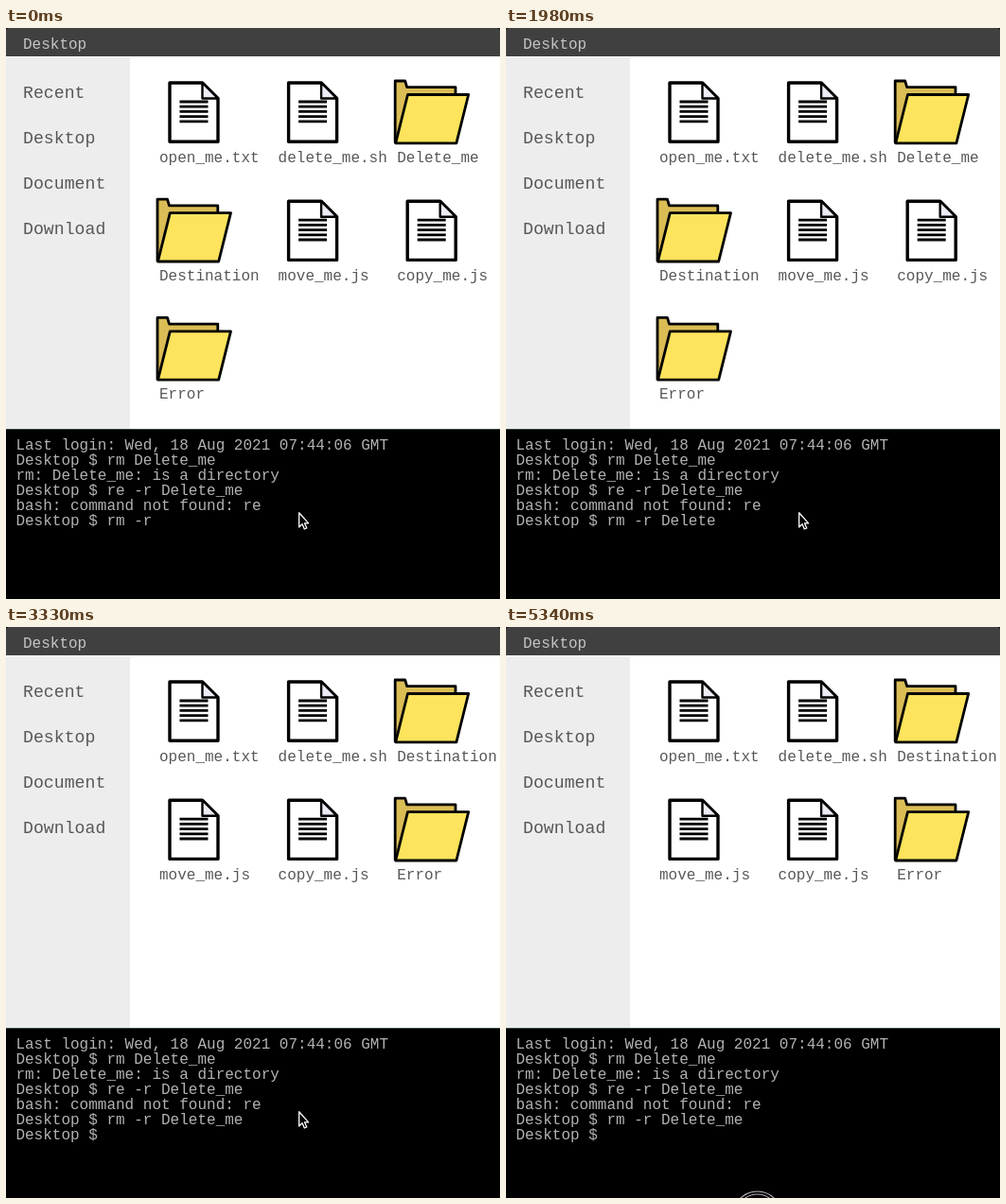
Recreate the animation shown at these times as an HTML page. Size 522 by 604 pixels, loop 5400 ms.

```html
<!DOCTYPE html>
<html lang="en">
<head>
<meta charset="utf-8">
<title>Desktop</title>
<style>
  html, body { margin: 0; width: 100%; height: 100%; overflow: hidden; background: #000; }
  svg { display: block; width: 522px; height: 604px; }
  text { font: 16px "Liberation Mono", monospace; white-space: pre; }
  .side { font-size: 18.2px; fill: #585858; }
  .label { fill: #585858; }
  .term { fill: #b2b2b2; }
</style>
</head>
<body>
<svg viewBox="0 0 522 604">
  <defs>
    <g id="doc" stroke="#000" stroke-width="3.4" stroke-linejoin="round">
      <path d="M11 58H45.5L62 74.5V120.2H11Z" fill="#fff"/>
      <path d="M45.5 58V74.5H62Z" fill="#ececf4" stroke-width="2.4"/>
      <path d="M21.5 78H51.5M21.5 83.2H51.5M21.5 88.4H51.5M21.5 93.6H51.5M21.5 98.8H51.5" stroke-width="2.8"/>
    </g>
    <g id="folder" stroke="#000" stroke-width="2.8" stroke-linejoin="round">
      <path d="M-2 56H8.5L10.5 62.7H61.8V74L49 121H-2Z" fill="#dbbd55"/>
      <path d="M11.3 70.5H75.5L62.7 121.8H-1.5Z" fill="#fde45c"/>
    </g>
  </defs>
  <rect width="522" height="604"/>
  <path d="M0 30V3Q0 0 3 0H519Q522 0 522 3V30Z" fill="#404040"/>
  <rect y="30" width="522" height="394" fill="#fff"/>
  <rect y="31" width="131" height="393" fill="#ededed"/>
  <rect y="424" width="522" height="1" fill="#34443b"/>
  <g id="chrome"></g>
  <g id="before"></g>
  <g id="after"></g>
  <g id="terminal"></g>
  <path id="cursor" d="M.7 .8V16L4.1 12.8L6.3 18L8.8 17L6.6 11.9H10.6Z"
        fill="#000" stroke="#fff" stroke-width="1.3" stroke-linejoin="round"/>
  <g id="button" fill="none" stroke="#b4b4b4">
    <circle cx="265.5" cy="622.5" r="25.5" stroke-width="1.2"/>
    <circle cx="265.5" cy="622.5" r="22.5"/>
  </g>
</svg>
<script>
const LOOP = 5400, ENTER = 3330;
const $ = id => document.getElementById(id);

function add(parent, tag, attrs, content = '') {
  const node = document.createElementNS('http://www.w3.org/2000/svg', tag);
  for (const key in attrs) node.setAttribute(key, attrs[key]);
  node.textContent = content;
  return parent.appendChild(node);
}

function drawFiles(parent, names) {
  names.forEach((name, i) => {
    const x = 162 + (i % 3) * 125.6, y = Math.floor(i / 3) * 125.2;
    const cell = add(parent, 'g', { transform: `translate(${x} ${y})` });
    add(cell, 'use', { href: name.includes('.') ? '#doc' : '#folder' });
    add(cell, 'text', { class: 'label', x: 0, y: 141.5 }, name);
  });
}

add($('chrome'), 'text', { x: 18, y: 21.5, fill: '#c4c4c4' }, 'Desktop');
['Recent', 'Desktop', 'Document', 'Download'].forEach((name, i) =>
  add($('chrome'), 'text', { class: 'side', x: 18, y: 73.5 + i * 48.3 }, name));

const files = ['open_me.txt', 'delete_me.sh', 'Delete_me', 'Destination',
  'move_me.js', 'copy_me.js', 'Error'];
drawFiles($('before'), files);
drawFiles($('after'), files.filter(name => name !== 'Delete_me'));

const lines = [
  'Last login: Wed, 18 Aug 2021 07:44:06 GMT',
  'Desktop $ rm Delete_me',
  'rm: Delete_me: is a directory',
  'Desktop $ re -r Delete_me',
  'bash: command not found: re',
  'Desktop $ rm -r ',
  'Desktop $ '
].map((line, i) =>
  add($('terminal'), 'text', { class: 'term', x: 10.4, y: 446.3 + i * 16 }, line));

// Each table row holds from its start time until the next one.
const typing = [
  [0, ''], [630, 'D'], [840, 'Dl'], [1140, 'D'], [1200, 'De'], [1290, 'Del'],
  [1440, 'Dele'], [1890, 'Delet'], [1980, 'Delete'], [2790, 'Delete_'],
  [3060, 'Delete_m'], [3150, 'Delete_me']
];
const pointer = [
  [0, [309, 512]], [4710, [315, 512.5]], [4740, [325, 526]], [4770, [336, 546]],
  [4800, [346, 570]], [4830, [353, 592]], [4860, [360, 620]]
];
const at = (table, t) => table.findLast(([start]) => start <= t)[1];
const show = (node, on) => node.setAttribute('visibility', on ? 'visible' : 'hidden');

function render() {
  const t = performance.now() % LOOP;
  const done = t >= ENTER;
  lines[5].textContent = 'Desktop $ rm -r ' + at(typing, t);
  show(lines[6], done);
  show($('before'), !done);
  show($('after'), done);
  $('cursor').setAttribute('transform', `translate(${at(pointer, t).join(' ')})`);
  show($('button'), t >= 5340);
  requestAnimationFrame(render);
}
render();
</script>
</body>
</html>
```
